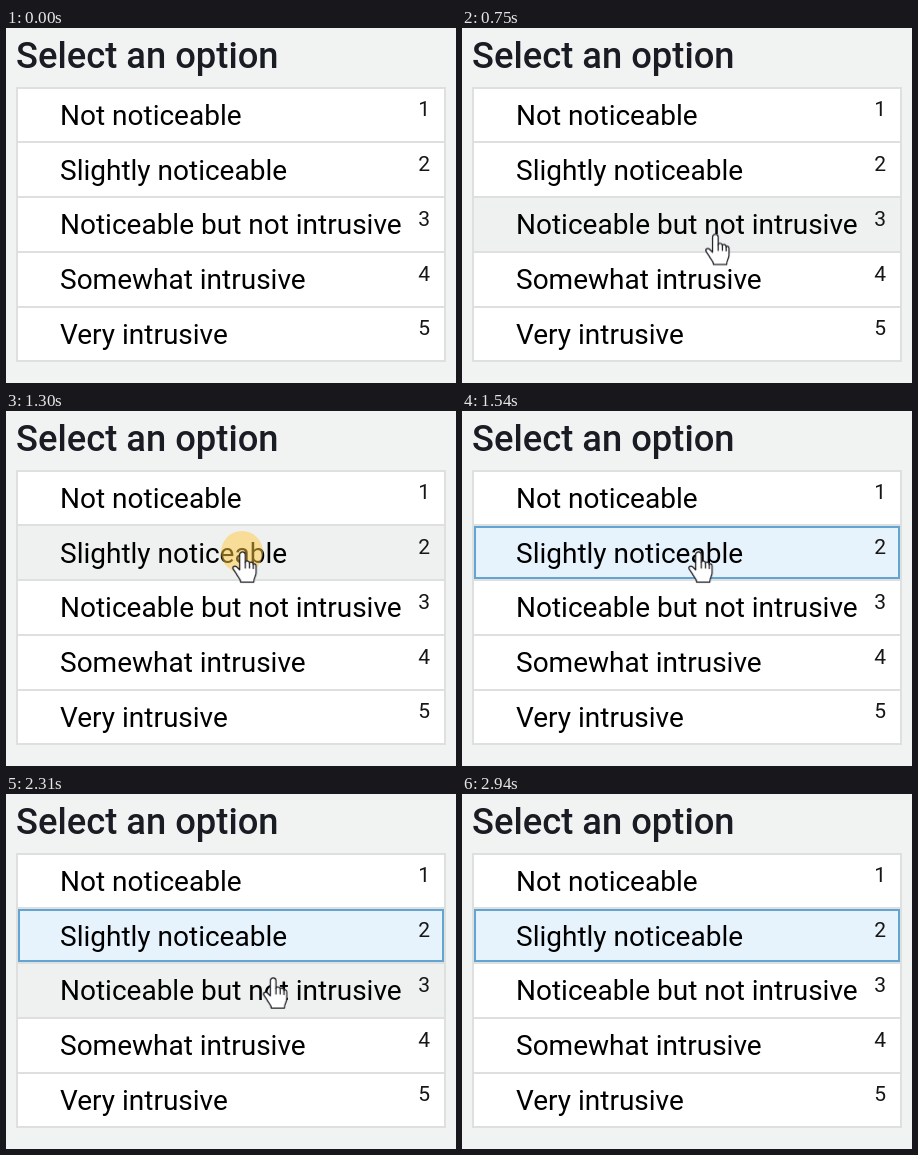
Write an HTML page that moves like this. It is 450x355 px and loops after 4.28 s.

```html
<!DOCTYPE html>
<html lang="en">
<head>
<meta charset="utf-8">
<title>Select an option</title>
<style>
  html, body { margin: 0; width: 100%; height: 100%; overflow: hidden; background: #f1f3f3; }
  svg { display: block; width: 450px; height: 355px; font-family: Roboto, sans-serif; }
  .title { font-size: 36.3px; font-weight: 500; fill: #1a1c23; }
  .label { font-size: 28px; }
  .key { font-size: 21px; text-anchor: middle; fill: #161616; }
  .line { fill: none; stroke: #dee0e0; stroke-width: 2; }
  .hover { fill: #eff1f1; opacity: 0; }
  #selected { fill: #e7f3fc; stroke: #62a4d2; stroke-width: 2; opacity: 0; }
  #click { fill: #ffc83c; opacity: 0; }
  #hand { fill: #fff; stroke: #1c1c24; stroke-width: 1.3; stroke-linejoin: round; stroke-linecap: round; visibility: hidden; }
</style>
</head>
<body>
<svg viewBox="0 0 450 355">
  <rect width="450" height="355" fill="#f1f3f3"/>
  <text class="title" x="10" y="40">Select an option</text>
  <rect x="11" y="60" width="428" height="273" fill="#fff"/>
  <g id="hovers"></g>
  <g id="lines"></g>
  <rect id="selected" x="13" y="116" width="424" height="51"/>
  <g id="labels"></g>
  <circle id="click" cx="236" cy="141" r="21"/>
  <g id="hand">
    <g transform="scale(.94)">
      <path d="M-3 19V3A3 3 0 0 1 3 3V11C3 9 7.5 9 7.5 12C8 10 11.5 10.5 11.5 13.5C12 12 14.5 12.5 14.5 15V22C14.5 26 12 27 12 32H-2C-2 28 -5 27 -7 22.5L-10 18C-11 15.5 -8 14 -6 16Z"/>
      <path fill="none" d="M3 11V17M7.5 12V17M11.5 13.5V17.5"/>
    </g>
  </g>
</svg>
<script>
const LOOP = 4280;
const TICK = 77;
const TOP = 59.5, PITCH = 54.75;
const options = ['Not noticeable', 'Slightly noticeable', 'Noticeable but not intrusive',
  'Somewhat intrusive', 'Very intrusive'];

// Samples an eased-out pointer move once per tick
function sweep(start, count, from, to, power) {
  return Array.from({ length: count }, (_, k) => {
    const rest = (1 - k / (count - 1)) ** power;
    const [x, y] = to.map((end, i) => end + (from[i] - end) * rest);
    return { t: start + k * TICK, x, y, shown: true };
  });
}

const away = t => ({ t, x: 0, y: 0, shown: false });
const path = [
  away(0),
  ...sweep(595, 7, [283, 321], [236.5, 141], 2.5),
  ...sweep(2155, 10, [242, 142.5], [355, 329], 1),
  away(2155 + 10 * TICK)
];

const byId = id => document.getElementById(id);

function add(parent, tag, attrs, text = '') {
  const el = document.createElementNS(byId('hand').namespaceURI, tag);
  for (const name in attrs) el.setAttribute(name, attrs[name]);
  el.textContent = text;
  byId(parent).append(el);
  return el;
}

// Plays [time, style] steps with hard changes
function play(el, steps) {
  const frames = steps.map(([t, style]) => ({ ...style, offset: t / LOOP, easing: 'step-end' }));
  frames.push({ ...steps[steps.length - 1][1], offset: 1 });
  el.animate(frames, { duration: LOOP, iterations: Infinity });
}

const fade = (el, steps) => play(el, steps.map(([t, opacity]) => [t, { opacity }]));

add('lines', 'rect', { class: 'line', x: 11, y: 60, width: 428, height: 273 });
options.forEach((name, i) => {
  const base = TOP + i * PITCH;
  const y = Math.round(base);
  const hover = add('hovers', 'rect', { class: 'hover', x: 12, y, width: 426, height: 55 });
  fade(hover, path.map(p => [p.t, Number(p.shown && Math.floor((p.y - TOP) / PITCH) === i)]));
  if (i) add('lines', 'path', { class: 'line', d: `M11 ${y}H439` });
  add('labels', 'text', { class: 'label', x: 54, y: Math.round(base + 37.3) }, name);
  add('labels', 'text', { class: 'key', x: 418.2, y: Math.round(base + 28.8) }, i + 1);
});

fade(byId('click'), [[0, 0], [1300, 0.5], [1480, 0]]);
fade(byId('selected'), [[0, 0], [1480, 0.5], [1540, 1]]);
play(byId('hand'), path.map(p => [p.t, {
  visibility: p.shown ? 'visible' : 'hidden',
  transform: `translate(${p.x}px, ${p.y}px)`
}]));
</script>
</body>
</html>
```
